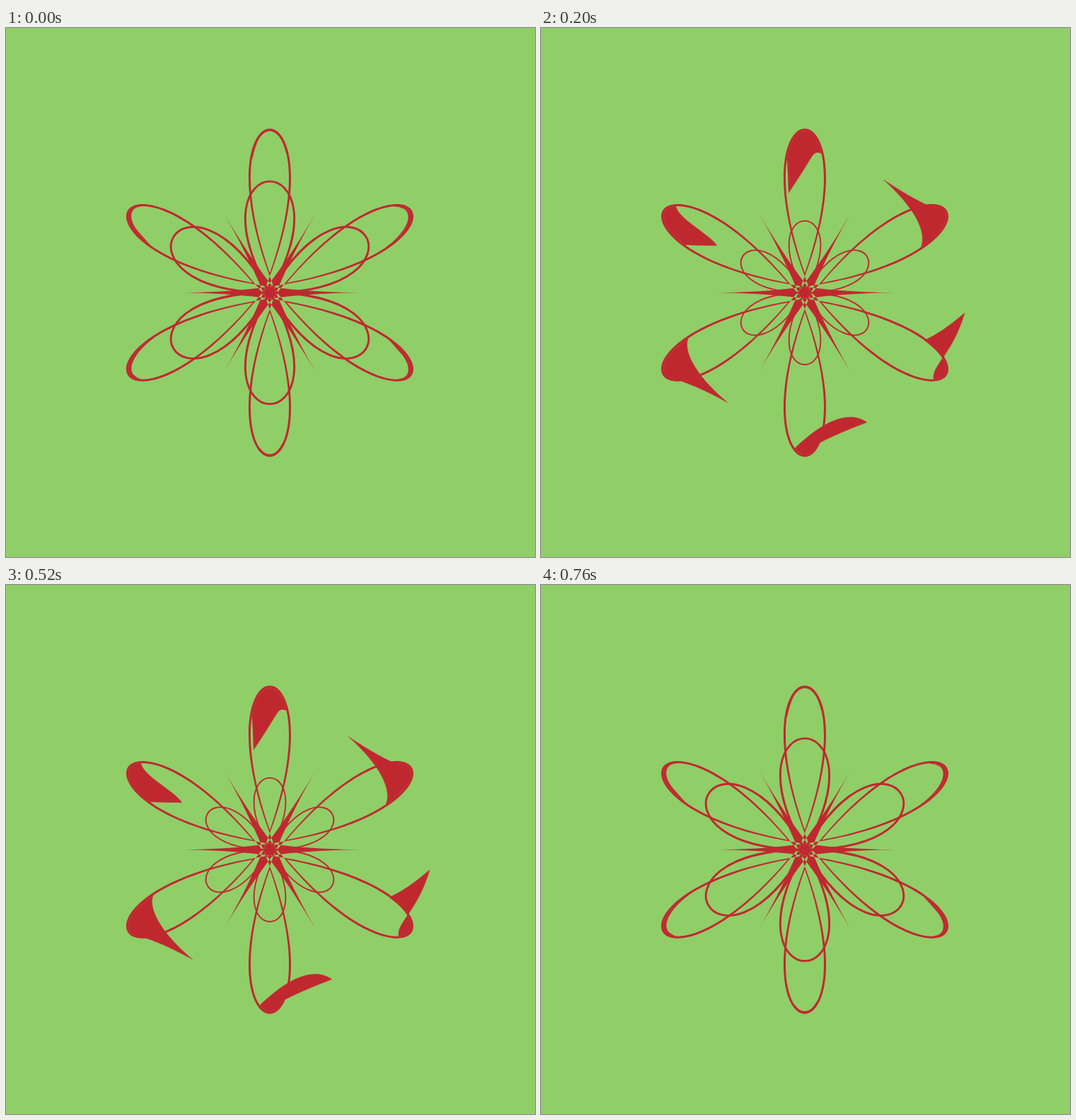
An HTML page for the animation above (1480 ms loop, 748 by 748 pixels).

```html
<!DOCTYPE html>
<html lang="en">
<head>
<meta charset="utf-8">
<title>Flower</title>
<style>
  html, body { margin: 0; width: 100%; height: 100%; overflow: hidden; background: #90ce68; }
  svg { display: block; width: 100vw; height: 100vh; }
</style>
</head>
<body>
<svg viewBox="0 0 748 748">
  <g transform="translate(373 374.3)" fill="#c02830" stroke="#c02830">
    <path id="ring" fill-rule="evenodd" stroke="none"/>
    <path id="tips" stroke-width="0.5"/>
    <path id="heart" fill="none" stroke-linejoin="bevel"/>
  </g>
</svg>
<script>
const LOOP = 1480, MOVE = 280, BACK = 480, STEP = 80;
const [ring, tips, heart] = ['ring', 'tips', 'heart'].map(id => document.getElementById(id));

// Per petal, clockwise, in the frame of the upright petal: end of the horn,
// its handle, and the heights where the horn leaves the right and left sides
const HORNS = [
  { end: [-22, -111], pull: [49, -71], roots: [197, 189] },
  { end: [-103, -151], pull: [75, -24], roots: [174, 214] },
  { end: [-118, -205], pull: [79, -11], roots: [219, 180] },
  { end: [-111, -160], pull: [48, 39], roots: [220, 214] },
  { end: [-99, -145], pull: [65, -25], roots: [175, 220] },
  { end: [-1, -115], pull: [9, -18], roots: [219, 181] }
];

const lerp = (a, b, t) => a + (b - a) * t;
const mix = (a, b, t) => a.map((v, i) => lerp(v, b[i], t));
const add = (a, b) => [a[0] + b[0], a[1] + b[1]];
const str = pts => pts.map(p => p[0].toFixed(2) + ' ' + p[1].toFixed(2)).join(' ');

function turn(k, pts) {
  const c = Math.cos(k * Math.PI / 3), s = Math.sin(k * Math.PI / 3);
  return pts.map(([x, y]) => [x * c - y * s, x * s + y * c]);
}

// Upright petal as a cubic: anchors lie past the centre by d, handles at (x, y)
function petal(d, x, y) {
  const h = d * Math.sqrt(3) / 2;
  return [[d / 2, h], [-x, -y], [x, -y], [-d / 2, h]];
}

function flower(shape) {
  let path = '';
  for (let k = 0; k < 6; k++) {
    const p = turn(k, shape);
    path += (k ? 'C' : 'M' + str([p[0]]) + 'C') + str(p.slice(1));
  }
  return path + 'Z';
}

// Polar form of a cubic, and the part of it from a to b
function polar(p, ...ts) {
  for (const t of ts) p = p.slice(1).map((q, i) => mix(p[i], q, t));
  return p[0];
}
const part = (p, a, b) => [polar(p, a, a, a), polar(p, a, a, b), polar(p, a, b, b), polar(p, b, b, b)];

const OUTER = petal(128, 197.3, 346.5);
const HOLE = petal(100, 167.3, 333.9);
const HEART = petal(3, 122.5, 210.7);

// Parameter of the hole's left side at a height above the centre
function leftAt(height) {
  const low = HOLE[0][1], q = (height + low) / (3 * (low - HOLE[1][1]));
  return (1 - Math.sqrt(1 - 4 * q)) / 2;
}

function drawRing() {
  const [[a], [b]] = HOLE;               // the sides of the hole cross where x = 0
  const q = a / (a - 3 * b), t = (1 - Math.sqrt(1 - 4 * q)) / 2;
  const hole = part(HOLE, t, 1 - t);
  let path = flower(OUTER);
  for (let k = 0; k < 6; k++) {
    const p = turn(k, hole);
    path += 'M' + str([p[0]]) + 'C' + str(p.slice(1)) + 'Z';
  }
  ring.setAttribute('d', path);
}

const horns = HORNS.map((h, k) => {
  const t1 = 1 - leftAt(h.roots[0]), t2 = leftAt(h.roots[1]), th = lerp(t1, t2, 0.75);
  // holes are squeezed sideways at rest, so slanted petals have heavier ends
  const [shift] = turn(-k, [[-4.6 * Math.sin(k * Math.PI / 3), 0]]);
  const rest = [...part(HOLE, t1, th).slice(1), polar(HOLE, th, t2, (th + t2) / 2)];
  return { ...h, arc: part(HOLE, t1, t2), rest: rest.map(p => add(p, shift)) };
});

// Swings a point around the centre
function swing(a, b, t) {
  const r = lerp(Math.hypot(...a), Math.hypot(...b), t);
  const w = lerp(Math.atan2(a[1], a[0]), Math.atan2(b[1], b[0]), t);
  return [r * Math.cos(w), r * Math.sin(w)];
}

function horn(h, k, t) {
  const [r1, r2, rEnd, r3] = h.rest, [j1, , , j2] = h.arc, soft = Math.sqrt(t);
  const end = swing(rEnd, h.end, t);
  const c1 = mix(r1, [j1[0] - 15, lerp(j1[1], -195, 0.7)], soft);
  const c2 = add(end, mix([r2[0] - rEnd[0], r2[1] - rEnd[1]], h.pull, t));
  const c3 = mix(r3, [lerp(end[0], j2[0], 0.58), lerp(end[1], j2[1], 0.45)], soft);
  const p = turn(k, [...h.arc, c3, end, c2, c1, j1]);
  return 'M' + str(p.slice(0, 1)) + 'C' + str(p.slice(1, 4)) +
    'Q' + str(p.slice(4, 6)) + 'C' + str(p.slice(6)) + 'Z';
}

function draw(bend) {
  const s = 1 - 0.495 * bend;
  heart.setAttribute('d', flower(HEART.map(([x, y]) => [x * s, y * s])));
  heart.setAttribute('stroke-width', 2.9 * s);
  tips.setAttribute('d', horns.map((h, k) => horn(h, k, bend)).join(''));
}

// Bends in steps, holds, and goes back the same way
function bendAt(t) {
  const out = Math.floor((t + STEP / 2) / STEP) * STEP - STEP / 2;
  const back = Math.floor((t - BACK + STEP / 2) / STEP) * STEP - STEP / 2;
  const ms = t < BACK + STEP / 2 ? Math.min(out, MOVE - STEP / 2 - 0) : MOVE - STEP - back;
  return Math.min(1, Math.max(0, ms / (MOVE - STEP / 2)));
}

let shown = -1;
function frame() {
  const bend = stepAt(performance.now() % LOOP);
  if (bend !== shown) draw(shown = bend);
  requestAnimationFrame(frame);
}

// Four frames out, a pause, four frames back; the first is half as long
function stepAt(t) {
  const n = from => Math.min(4, Math.max(0, Math.floor((t - from) / STEP) + 1));
  const frames = n(40) - n(520);
  return Math.max(0, 2 * frames - 1) / 7;
}

drawRing();
frame();
</script>
</body>
</html>
```
